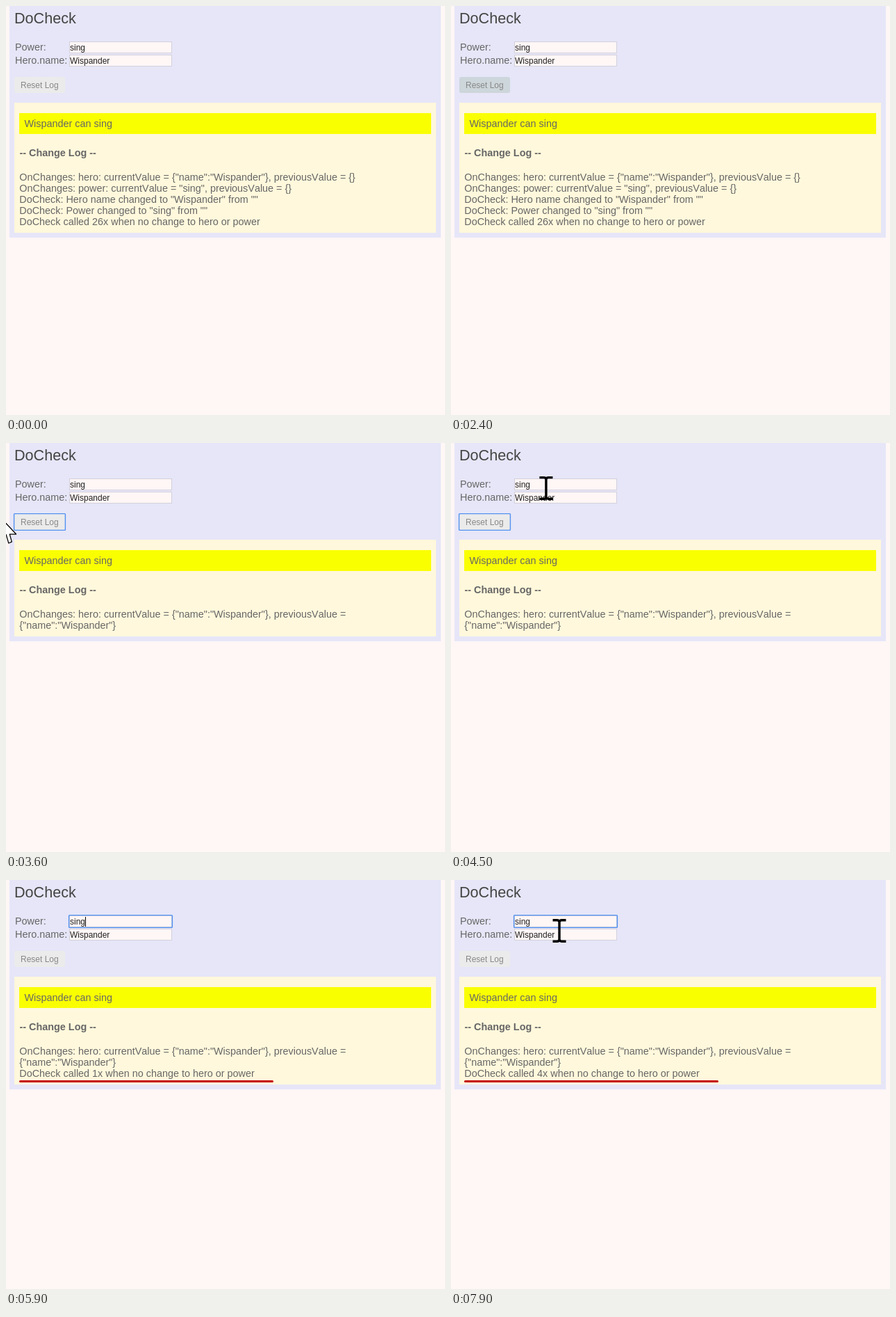
Write an HTML page that moves like this. It is 632 px wide and 588 px high and loops after 8000 ms.

```html
<!DOCTYPE html>
<html lang="en">
<head>
<meta charset="utf-8">
<title>DoCheck</title>
<style>
html, body { margin: 0; width: 100%; height: 100%; overflow: hidden; background: #fff6f6; }
svg { display: block; }
text { font: 14.4px "Liberation Sans", Arial, sans-serif; font-kerning: none; fill: #666; white-space: pre; }
.title { font-size: 21.6px; fill: #444; }
.bold { font-weight: bold; }
.value { font-size: 12px; fill: #222; }
.label { font-size: 12px; fill: #888; }
.field { fill: #fff6f6; stroke: #d3d0dc; }
.pointer { fill: #fff; stroke: #000; stroke-linejoin: round; }
</style>
</head>
<body>
<svg width="632" height="588" viewBox="0 0 632 588">
  <rect id="panel" x="5" width="621" fill="#e6e6f8"/>
  <text class="title" x="12" y="25">DoCheck</text>
  <text x="13" y="64">Power:</text>
  <text x="13" y="83">Hero.name:</text>
  <rect class="field" x="91.5" y="51.5" width="147" height="16"/>
  <rect class="field" x="91.5" y="70.5" width="147" height="16"/>
  <text class="value" id="power" x="92" y="64">sing</text>
  <text class="value" id="hero" x="92" y="83">Wispander</text>
  <rect id="button" x="12" y="102" width="73" height="23" rx="3"/>
  <text class="label" x="21" y="118">Reset Log</text>
  <rect id="ring" rx="1" fill="none" stroke="#5292f0" stroke-width="1.4"/>
  <rect id="caret" width="1" height="14"/>
  <rect id="box" x="12" y="139" width="607" fill="#fff8dc"/>
  <rect x="19" y="154" width="593" height="30" fill="#faff00"/>
  <text x="26.5" y="174">Wispander can sing</text>
  <text class="bold" x="19.5" y="216">-- Change Log --</text>
  <g id="log"></g>
  <path id="mark" d="M20.5 0H383.5" stroke="#c40000" stroke-width="3" stroke-linecap="round"/>
  <g id="cursor">
    <path class="pointer" id="arrow" transform="scale(1.8)" stroke-width=".7"
      d="M0 0V17L4 13.2L6 20L8.5 19L6.8 12.8H12Z"/>
    <path class="pointer" id="hand" transform="scale(2)"
      d="M-1.5 13V2Q-1.5 .5 0 .5T1.5 2V7.5Q3 5.5 4.5 8Q6 6 7.5 9Q9 7 10.5 10V15L8.5 19V22.5H-1V19.5L-5 13.5Q-5-9 -1.5 13Z"/>
    <path id="beam" fill="none" stroke="#000" stroke-width="3.4"
      d="M-9.5-15.3h6q3.5 0 3.5 3v24.6q0 3-3.5 3h-6M9.5-15.3h-6q-3.5 0-3.5 3M9.5 15.3h-6q-3.5 0-3.5-3"/>
  </g>
</svg>
<script>
const $ = id => document.getElementById(id);
const set = (id, attrs) => { for (const k in attrs) $(id).setAttribute(k, attrs[k]); };
const show = (id, on) => $(id).style.display = on ? '' : 'none';
const clamp = v => Math.max(0, Math.min(1, v));

const called = n => `DoCheck called ${n}x when no change to hero or power`;
const change = 'OnChanges: hero: currentValue = {"name":"Wispander"}, previousValue = ';
const firstLog = [change + '{}',
  'OnChanges: power: currentValue = "sing", previousValue = {}',
  'DoCheck: Hero name changed to "Wispander" from ""',
  'DoCheck: Power changed to "sing" from ""', called(26)];
const resetLog = [change, '{"name":"Wispander"}'];

// Pointer stops: time, x, y and what is clicked there
const stops = [
  [2100, 49, 119], [2600, 49, 119, 'button'], [3100, -24, 112], [3500, -24, 112],
  [3600, -7, 108], [4100, 126, 58], [5200, 156, 77, 'hero'], [6100, 156, 64, 'power'],
  [6700, 156, 77, 'hero'], [7500, 156, 64, 'power'], [7900, 156, 73], [8000, 156, 73]];
const clicks = stops.filter(s => s[3]);
const press = 200; // time from mouse down to its effect, and until the pointer shows again

function pointerAt(t) {
  const i = Math.max(1, stops.findIndex(s => s[0] > t));
  const a = stops[i - 1], b = stops[i], k = clamp((t - a[0]) / (b[0] - a[0]));
  return [a[1] + (b[1] - a[1]) * k, a[2] + (b[2] - a[2]) * k];
}

function drawLog(lines) {
  const key = lines.join('\n');
  if ($('log').dataset.key === key) return;
  $('log').dataset.key = key;
  $('log').replaceChildren(...lines.map((line, i) => {
    const el = document.createElementNS('http://www.w3.org/2000/svg', 'text');
    el.setAttribute('x', 19.3);
    el.setAttribute('y', 251 + 16 * i);
    el.textContent = line;
    return el;
  }));
}

function drawFocus(t) {
  const click = clicks.filter(c => t >= c[0] - (c[3] === 'button' ? 0 : press)).pop();
  const field = click && click[3] !== 'button';
  show('ring', click);
  show('caret', field && (t - click[0] + press) % 1000 < 500);
  if (field) {
    const text = $(click[3]), y = text.getAttribute('y') - 13;
    set('ring', { x: 90.6, y: y - .4, width: 148.8, height: 17.8 });
    set('caret', { x: Math.round(92 + text.getComputedTextLength()), y: y + 2 });
  } else set('ring', { x: 11.6, y: 101.6, width: 73.8, height: 23.8 });
}

function drawMark(t) {
  const again = t >= 5000;
  const fadeIn = clamp(.1 + .9 * (t - (again ? 5300 : 100)) / 400) * (t >= (again ? 5300 : 100));
  const fadeOut = again ? 1 : clamp(.94 - (t - 1600) / 450);
  set('mark', { transform: `translate(0 ${again ? 289.5 : 319.5})`, opacity: Math.min(fadeIn, fadeOut) });
}

function drawPointer(t) {
  const [x, y] = pointerAt(t);
  const hand = t < 3000 && x > 12;
  set('button', { fill: t >= 2100 && hand ? '#cdd6da' : '#ebebeb' });
  show('cursor', t >= 2100 && !clicks.some(c => t >= c[0] - press && t < c[0] + press));
  set('cursor', { transform: `translate(${x} ${y})` });
  show('hand', hand);
  show('arrow', !hand && x < 90);
  show('beam', x >= 90);
}

function draw(now) {
  const t = Math.floor(now % 8000 / 100) * 100;
  const n = clicks.filter(c => t >= c[0]).length;
  const lines = !n ? firstLog : n > 1 ? [...resetLog, called(n - 1)] : resetLog;
  const bottom = 246 + 16 * lines.length;
  drawLog(lines);
  set('panel', { height: bottom + 7 });
  set('box', { height: bottom - 139 });
  drawFocus(t);
  drawMark(t);
  drawPointer(t);
  requestAnimationFrame(draw);
}
draw(0);
</script>
</body>
</html>
```
